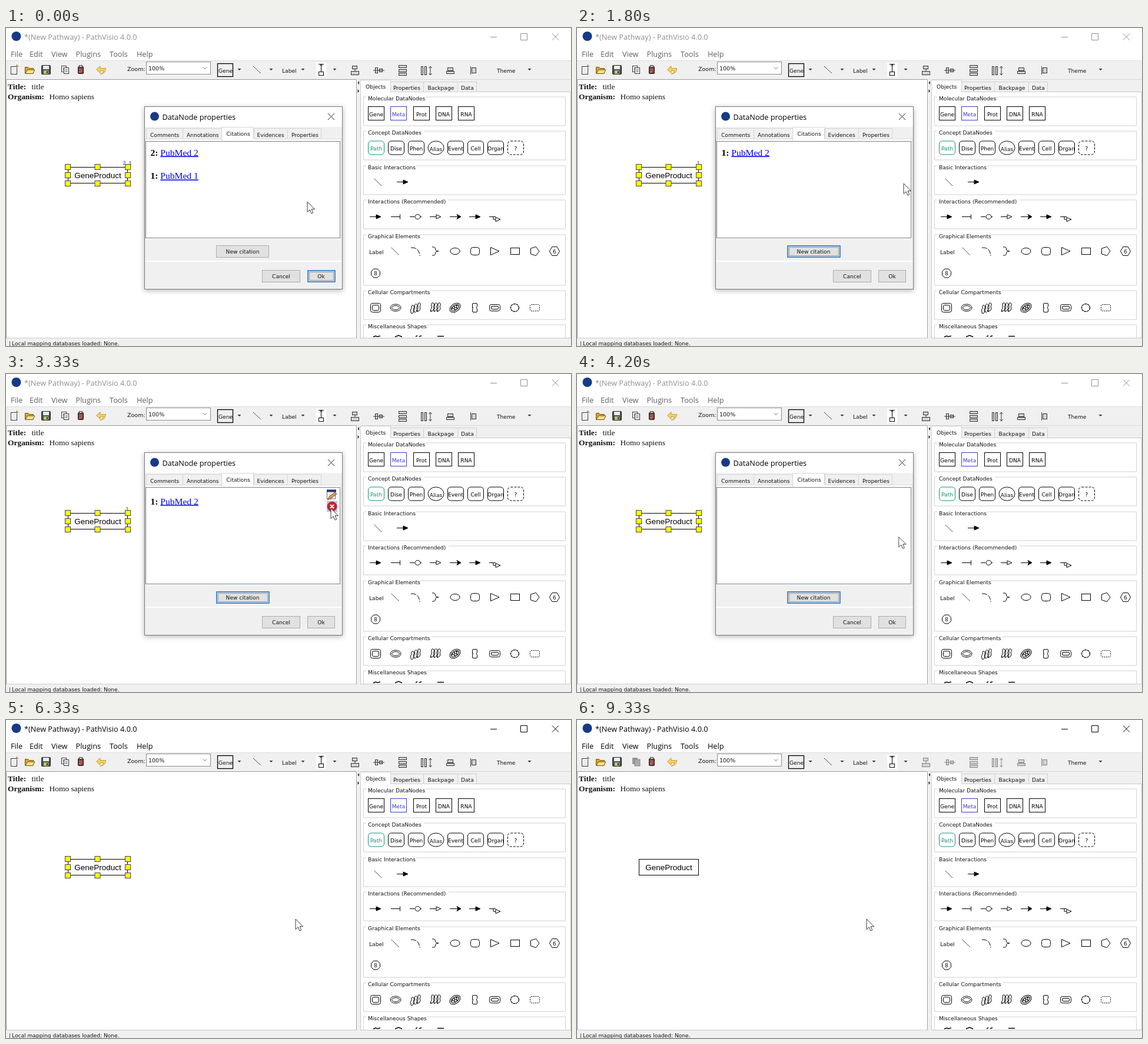
An HTML page for the animation above (9.74 s loop, 960 by 540 pixels).

```html
<!DOCTYPE html>
<html lang="en">
<head>
<meta charset="utf-8">
<title>Citations dialog</title>
<style>
html, body { margin: 0; width: 100%; height: 100%; overflow: hidden; background: #fff; }
svg { display: block; width: 960px; height: 540px; }
text { white-space: pre; }
.ui { font: 9.1px "DejaVu Sans", sans-serif; }
.zoom { font: 9.5px "DejaVu Sans", sans-serif; }
.win { font: 12.7px "Open Sans", sans-serif; }
.serif { font: 13.45px "Liberation Serif", serif; }
.cite { font: 15.6px "Liberation Serif", serif; }
.arial { font: 13.5px "Liberation Sans", sans-serif; }
.tag { font: 9px "Liberation Sans", sans-serif; }
.mid { text-anchor: middle; }
.b { font-weight: bold; }
.link { fill: #00e; text-decoration: underline 1px; }
.line { fill: none; stroke: #000; }

/* Every track shares one 9.74 s clock. */
.t { animation: 9740ms step-end infinite; }
.title { animation-name: title; }
.menu { animation-name: menu; }
.tool { animation-name: tool; }
.late { animation-name: late; }
.picked { animation-name: picked; }
.dialog { animation-name: dialog; }
.pair { animation-name: pair; }
.single { animation-name: single; }
.drop1 { animation-name: drop1; }
.drop2 { animation-name: drop2; }
.icons1 { animation-name: icons1; }
.icons2 { animation-name: icons2; }
.hot1 { animation-name: hot1; }
.hot2 { animation-name: hot2; }
.newring { animation-name: newring; }
.newdots { animation-name: newdots; }
.pressed { animation-name: pressed; }
.cursor { animation: cursor 9740ms ease-in-out infinite; }

@keyframes title { 0% { color: #8f8f8f } 54.1%, 100% { color: #000 } }
@keyframes menu { 0% { color: #5f5f5f } 54.1%, 100% { color: #000 } }
@keyframes tool { 0% { color: #333 } 91.68%, 100% { color: #858585 } }
@keyframes late { 0% { opacity: 0 } 91.68%, 100% { opacity: 1 } }
@keyframes picked { 0% { opacity: 1 } 91.68%, 100% { opacity: 0 } }
@keyframes dialog { 0% { opacity: 1 } 54.1%, 100% { opacity: 0 } }
@keyframes pair { 0% { opacity: 1 } 14.4%, 100% { opacity: 0 } }
@keyframes single { 0% { opacity: 0 } 14.4% { opacity: 1 } 35.9%, 100% { opacity: 0 } }
@keyframes drop1 { 0% { transform: none } 6.5%, 100% { transform: translateY(4.7px) } }
@keyframes drop2 { 0% { transform: none } 23.9%, 100% { transform: translateY(4.7px) } }
@keyframes icons1 { 0% { opacity: 0 } 6.5% { opacity: 1 } 14.4%, 100% { opacity: 0 } }
@keyframes icons2 { 0% { opacity: 0 } 23.9% { opacity: 1 } 35.9%, 100% { opacity: 0 } }
@keyframes hot1 { 0% { opacity: 0 } 8.4% { opacity: 1 } 14.4%, 100% { opacity: 0 } }
@keyframes hot2 { 0% { opacity: 0 } 28.7% { opacity: 1 } 35.9%, 100% { opacity: 0 } }
@keyframes newring { 0% { opacity: 0 } 14.4%, 100% { opacity: 1 } }
@keyframes newdots { 0% { opacity: 0 } 14.4% { opacity: 1 } 50.3%, 100% { opacity: 0 } }
@keyframes pressed { 0% { opacity: 0 } 50.3%, 100% { opacity: 1 } }
@keyframes cursor {
  0%, .7% { transform: translate(512px, 295px) }
  9.75%, 20.5% { transform: translate(555px, 264px) }
  26.7% { transform: translate(544px, 216px) }
  30.8%, 36.4% { transform: translate(552px, 228px) }
  41.6% { transform: translate(547px, 268px) }
  50.8%, 54.9% { transform: translate(540px, 419px) }
  61.6%, 100% { transform: translate(492px, 338px) }
}
</style>
</head>
<body>
<svg id="stage" viewBox="0 0 960 540" xmlns="http://www.w3.org/2000/svg"></svg>
<script>
const text = (x, y, s, cls = "ui", fill = "#111") =>
  `<text x="${x}" y="${y}" class="${cls}" fill="${fill}">${s}</text>`;
const rect = (x, y, w, h, fill = "none", stroke = "none", more = "") =>
  `<rect x="${x}" y="${y}" width="${w}" height="${h}" fill="${fill}" stroke="${stroke}" ${more}/>`;
const path = (d, more = 'class="line"') => `<path d="${d}" ${more}/>`;
const oval = (x, y, rx, ry, more = 'class="line"') =>
  `<ellipse cx="${x}" cy="${y}" rx="${rx}" ry="${ry}" ${more}/>`;
const group = (cls, ...parts) => `<g class="${cls}">${parts.join("")}</g>`;
const solid = c => `fill="${c}"`;
const dash = 'class="line" stroke-dasharray="2 1"';
const cur = "currentColor";

const polygon = (x, y, r, n, turn = 0) => path("M" + Array.from({ length: n }, (_, i) => {
  const a = turn + i * 2 * Math.PI / n;
  return (x + r * Math.cos(a)).toFixed(1) + " " + (y + r * Math.sin(a)).toFixed(1);
}).join("L") + "Z");

function titleBar() {
  return rect(0, 0, 960, 55, "#fff") + oval(17.5, 14, 8, 8, solid("#173a86")) +
    group("t title",
      text(31, 20, "*(New Pathway) - PathVisio 4.0.0", "win", cur),
      path("M823 15.5H834M874.5 9.5H885.5V20.5H874.5ZM928 9.5L939 20.5M939 9.5L928 20.5",
        `fill="none" stroke="${cur}"`)) +
    group("t menu", ...[[8, "File"], [40, "Edit"], [77, "View"], [118.5, "Plugins"], [176, "Tools"], [222, "Help"]]
      .map(([x, s]) => text(x, 49, s, "win", cur)));
}

function toolBar() {
  const arrow = x => path(`M${x - 3} 69H${x + 3}L${x} 72Z`, solid("#333"));
  const page = (x, y) => rect(x, y, 8, 10, "#fff", cur) +
    path(`M${x + 2} ${y + 3}h4m-4 2h4m-4 2h4`, `stroke="${cur}" stroke-width=".7"`);
  const box = (x, y, w, h) => rect(x, y, w, h, "#d2d2d2", cur);
  const bars = d => path(d, `fill="none" stroke="${cur}"`);
  return rect(0, 55, 960, 32, "#f0f0f0") + path("M0 55.5H960", 'stroke="#dcdcdc"') +
    rect(8.5, 65.5, 10, 13, "#fff", "#333") + path("M18.5 62v6m-3-3h6", 'stroke="#8a7440" stroke-width="1.2"') +
    path("M11 69h5m-5 3h5m-5 3h5", 'stroke="#ccc"') +
    path("M32.5 77V66.5h5l2 2h7V77Z", 'fill="#d9a528" stroke="#6e5212"') +
    path("M33 77.5L36.5 71H49L45.5 77.5Z", 'fill="#ffe08a" stroke="#6e5212"') +
    rect(60.5, 63.5, 15, 15, "#4a4f57", "#222", 'rx="1"') + rect(63, 64, 10, 6, "#e9eff4") +
    rect(64, 72, 8, 6, "#b6c56e") + rect(69, 73, 2, 4, "#333") +
    group("t tool", page(94.5, 64.5), page(98.5, 67.5)) +
    group("t late", rect(94, 64, 9, 11, "#999"), rect(98, 67, 9, 11, "#aaa", "#888")) +
    rect(122.5, 65.5, 9, 12, "#7a3a32", "#2a1614", 'rx="1"') + rect(124.5, 63.5, 5, 3, "#ccc", "#444") +
    path("M124 70h6m-6 3h6m-6 2h4", 'stroke="#c99"') +
    path("M153.5 70.5L160 64.5V68.5H169.5Q169.5 77 160 78.5Q166 75 165.5 72.5H160V76.5Z",
      'fill="#f8d25c" stroke="#b58a28" stroke-width=".8"') +
    text(206, 73, "Zoom:", "zoom") + rect(238.5, 57.5, 109, 21, "#fff", "#8a8a8a") + text(242, 72, "100%", "zoom") +
    path("M335 66.5L338 69.5L341 66.5", 'fill="none" stroke="#666"') +
    rect(359.5, 60.5, 26, 22, "#f0f0f0", "#000", 'stroke-width="1.3"') + text(373, 76, "Gene", "ui mid") +
    [396.5, 450.5, 504.5, 558.5, 889.5].map(arrow).join("") +
    path("M420 65L433 77", dash) + text(469, 76, "Label") +
    rect(527, 59, 17, 24, "#fff") + path("M531 61.5H540M535.5 62V74M533 64.5L535.5 62L538 64.5") +
    rect(531.5, 74.5, 8, 6, "#fff", "#000") +
    group("t tool",
      box(588.5, 64.5, 8, 5), box(586.5, 73.5, 13, 6), bars("M593 70V73"),
      box(627.5, 67.5, 4, 9), box(634.5, 69.5, 5, 5), bars("M624 72H643"),
      box(667.5, 63.5, 13, 4), box(667.5, 70.5, 13, 4), box(667.5, 76.5, 13, 4),
      box(705.5, 65.5, 3, 14), box(711.5, 65.5, 3, 14), bars("M721 65V80M718.5 68L721 65L723.5 68M718.5 77L721 80L723.5 77"),
      box(750.5, 67.5, 9, 5), box(748.5, 73.5, 13, 4),
      bars("M789.5 65V79"), box(791.5, 67.5, 7, 9)) +
    text(834, 76, "Theme");
}

function canvasPane() {
  return rect(0, 87, 597, 440, "#fff") + path("M.5 526V87.5H595.5V526", 'fill="none" stroke="#9a9a9a"') +
    path("M0 526.5H960", 'stroke="#ccc"') +
    text(3, 104, "Title:", "serif b") + text(43.5, 104, "title", "serif") +
    text(3, 121, "Organism:", "serif b") + text(73.5, 121, "Homo sapiens", "serif") +
    rect(105.5, 236.5, 101, 27, "#fff", "#000") +
    text(156, 254.5, "GeneProduct", "arial mid", "#000") +
    group("t pair", text(198.5, 232, "2, 1", "tag", "#1c2f9c")) +
    group("t single", text(203.5, 232, "1", "tag", "#222a55")) +
    group("t picked", ...[236, 250, 264].flatMap(y => [105, 155.5, 207]
      .filter(x => x !== 155.5 || y !== 250)
      .map(x => rect(x - 4.5, y - 4.5, 9, 9, "#ffff00", "#444"))));
}

function sidePanel() {
  const frames = [["Molecular DataNodes", 117, 166, 99], ["Concept DataNodes", 175, 224, 96],
    ["Basic Interactions", 234, 283, 83], ["Interactions (Recommended)", 292, 341, 138],
    ["Graphical Elements", 351, 437, 90], ["Cellular Compartments", 446, 495, 108],
    ["Miscellaneous Shapes", 504, 560, 101]];
  const tabs = [[653, 56, 658, "Properties"], [709, 58, 716.5, "Backpage"], [767, 32, 773, "Data"]];
  const frame = ([name, top, end, w]) =>
    path(`M612 ${top}H607.5V${end}H950.5V${top}H${614 + w}`, 'fill="none" stroke="#d0d0d0"') +
    text(615, top + 6, name);
  const node = (x, y, s, c, r) =>
    rect(x + .5, y + .5, 27, 23, "#fff", c, `rx="${r}" ${s === "?" ? 'stroke-dasharray="4 2"' : ""}`) +
    text(x + 14, y + 16.5, s, "ui mid", c);
  const head = (x, y, fill) => path(`M${x} ${y - 3.5}L${x + 8} ${y}L${x} ${y + 3.5}Z`, `fill="${fill}" stroke="#000"`);
  const stem = (x, y, w) => path(`M${x} ${y}H${x + w}`);
  const y = 320.5, g = 379, c = 475;

  const basics = path("M626 256L638 268", dash) + stem(664, 261.5, 12) + head(675, 261.5, "#000");
  const links = stem(618, y, 12) + head(629, y, "#000") +
    stem(654, y, 15) + path(`M669.5 ${y - 4}v8`) +
    stem(686, y, 8) + oval(699.5, y, 4.5, 4) + stem(704, y, 2) +
    stem(720, y, 11) + head(731, y, "#fff") +
    stem(754, y, 18) + path(`M766 ${y - 4}L773 ${y}L766 ${y + 4}L768 ${y}Z`, 'stroke="#000"') +
    stem(787, y, 12) + head(798, y, "#000") +
    path(`M821 ${y}H832M828 ${y}V325H832`) + head(832, 325, "#fff");
  const shapes = text(617, 383.5, "Label") + path("M655 373L668 386", dash) +
    path("M688 373Q702 372 703 387", 'class="line" stroke-dasharray="9 2"') +
    path("M724 372Q730 371 729.5 376Q730 379 735 379Q730 379 729.5 382Q730 387 724 386") +
    oval(763, g, 8, 5.5) + rect(789.5, 372.5, 15, 13, "none", "#000", 'rx="4"') +
    path("M823.5 372.5L838 379L823.5 385.5Z") + rect(857.5, 373.5, 15, 11, "none", "#000") +
    polygon(898, g, 8, 5) + polygon(932, g, 8.5, 6) + text(932, 382.5, "6", "ui mid") +
    polygon(628, 416.5, 8, 8, Math.PI / 8) + text(628, 420, "8", "ui mid");

  // Stacked lobes, growing taller to one side.
  const golgi = (x, grow) => [0, 1, 2].map(k => {
    const left = x - 8 + k * 5.5, top = c - 3 - (grow ? k * 2 : 4);
    return path(`M${left} ${c + 7}q-2 -3 1 -6V${top}q2 -3 4 0q1 3 -1 5q2 3 0 6q-2 3 -4 1Z`);
  }).join("");
  const cells = rect(619.5, 467.5, 17, 15, "none", "#000", 'rx="3"') + rect(622.5, 470.5, 11, 9, "none", "#000", 'rx="2"') +
    oval(662, c, 9, 6) + oval(662, c, 6.5, 3.5) + golgi(696, true) + golgi(730, false) +
    `<g transform="rotate(-35 763 ${c})">${oval(763, c, 10, 6.5)}${oval(763, c, 7.5, 4)}` +
    path(`M757 ${c}l2 -3l2 6l2 -6l2 6l2 -6l2 4`) + "</g>" +
    path(`M792.5 ${c}V469Q792.5 467.5 794 467.5H799Q800.5 467.5 800.5 469V${c - 2}L799 ${c}L800.5 ${c + 2}V481Q800.5 482.5 799 482.5H794Q792.5 482.5 792.5 481V${c + 2}L794 ${c}Z`) +
    rect(821.5, 469.5, 18, 11, "none", "#000", 'rx="3"') + rect(824.5, 472.5, 12, 5, "none", "#000", 'rx="1.5"') +
    oval(864.5, c, 7, 6.5, 'class="line" stroke-width="1.3" stroke-dasharray="4 .8"') +
    rect(890.5, 469.5, 16, 11, "none", "#000", 'rx="2" stroke-dasharray="2 1.5"');
  const misc = path("M624 524.5L628 523L631 524L636 523M661 524.5L667 522L673 524.5M696 524L699 522.5M702 524L706 522.5M733 523.5H744",
    'class="line" stroke-width="1.4"');

  return rect(597, 87, 363, 440, "#f0f0f0") + path("M597 87.5H960", 'stroke="#d8d8d8"') +
    path("M600 90V96L597.5 93ZM597.5 104V110L600 107Z", solid("#222")) +
    rect(602.5, 108.5, 357, 418, "#fff", "#c8c8c8") +
    tabs.map(([x, w, tx, s]) => rect(x + .5, 91.5, w, 17, "#f0f0f0", "#d0d0d0") + text(tx, 105, s)).join("") +
    rect(603, 89, 50, 21, "#fff") + path("M602.5 109V88.5H653.5V109", 'fill="none" stroke="#d0d0d0"') +
    text(611, 103, "Objects") + frames.map(frame).join("") +
    ["Gene", "Meta", "Prot", "DNA", "RNA"].map((s, i) => node(615 + Math.round(i * 38.3), 133, s, i === 1 ? "#3a3ad0" : "#000", 0)).join("") +
    ["Path", "Dise", "Phen", "", "Event", "Cell", "Organ", "?"].map((s, i) => s &&
      node(615 + Math.round(i * 33.85), 191.5, s, i ? "#000" : "#148f77", 5)).join("") +
    oval(730.5, 203.5, 13.5, 11.5) + text(730.5, 208.5, "Alias", "ui mid") +
    basics + links + shapes + cells + misc;
}

function statusBar() {
  return rect(0, 527, 960, 13, "#f0f0f0") + path("M6.5 532V540", 'stroke="#555"') +
    text(10, 539, "Local mapping databases loaded: None.");
}

function editIcons(y, hot) {
  return rect(545.5, y - 8.5, 14, 15, "#fff", "#667") + rect(545, y - 9, 16, 4, "#27366e") +
    path(`M548 ${y}h8m-8 3h6`, 'stroke="#bbb"') +
    path(`M546.5 ${y + 8}L549 ${y + 3}L559 ${y - 5}L562 ${y - 2}L552 ${y + 6}Z`, 'fill="#d99a4e" stroke="#553311" stroke-width=".8"') +
    group("t " + hot, rect(545, y + 10, 18, 19, "#b9c6ee")) +
    oval(554, y + 19.5, 8, 8, 'fill="#d0202c" stroke="#9a1720" stroke-width=".7"') +
    path(`M551 ${y + 16.5}l6 6m0 -6l-6 6`, 'stroke="#fff" stroke-width="2.2"');
}

function dialogBox() {
  const tabs = [[238, 62, 245, "Comments"], [300, 67, 307, "Annotations"], [421, 57, 426.5, "Evidences"], [478, 57, 485, "Properties"]];
  const button = (x, y, w, s) => rect(x + .5, y + .5, w, 20, "#e1e1e1", "#adadad") + text(x + w / 2 + .5, y + 14, s, "ui mid");
  const ring = (x, y, w) => rect(x + 1, y + 1, w - 1, 19, "none", "#2f7fcb", 'stroke-width="1.6"');
  const dots = (x, y, w) => rect(x + 3.5, y + 3.5, w - 6, 14, "none", "#555", 'stroke-dasharray="1 1"');
  const cite = (y, n, id) => text(245.5, y, n + ":", "cite b", "#000") + text(262.3, y, "PubMed " + id, "cite link");
  return rect(235.5, 133.5, 336, 310, "#f0f0f0", "#7a7a7a", 'filter="url(#shade)"') +
    rect(236, 134, 335, 34, "#fff") + oval(252.5, 150, 7.5, 7.5, solid("#173a86")) +
    text(265.5, 156, "DataNode properties", "win", "#000") + path("M547 145L558 156M558 145L547 156", 'stroke="#222"') +
    rect(236.5, 188.5, 333, 170, "#fff", "#d9d9d9") + rect(236, 358, 335, 38, "#f0f0f0") +
    tabs.map(([x, w, tx, s]) => rect(x + .5, 170.5, w, 18, "#f0f0f0", "#d5d5d5") + text(tx, 184.5, s)).join("") +
    rect(366.5, 168.5, 54, 22, "#fff", "#d5d5d5") + rect(367, 188, 54, 4, "#fff") + text(374.5, 182.5, "Citations") +
    rect(237.5, 192.5, 330, 164, "#fff", "#7b7f86") + path("M236 396H571", 'stroke="#fff" stroke-width="2"') +
    button(357, 369, 89, "New citation") + button(435, 411, 64, "Cancel") + button(512, 411, 46, "Ok") +
    group("t pair", ring(512, 411, 47), dots(512, 411, 47)) +
    group("t newring", ring(357, 369, 90)) + group("t newdots", dots(357, 369, 90)) +
    group("t pressed", rect(512.5, 411.5, 46, 20, "#e5f1fb", "#2a80cc"), text(535.5, 425, "Ok", "ui mid"), dots(512, 411, 47)) +
    group("t pair", cite(216.5, 2, 2), group("t drop1", cite(256.3, 1, 1))) +
    group("t single", group("t drop2", cite(216.5, 1, 2))) +
    group("t icons1", editIcons(245, "hot1")) + group("t icons2", editIcons(205.5, "hot2"));
}

document.getElementById("stage").innerHTML =
  `<defs><filter id="shade" x="-10%" y="-10%" width="120%" height="120%">
    <feDropShadow dx="0" dy="2" stdDeviation="4" flood-color="#000" flood-opacity=".3"/></filter></defs>` +
  titleBar() + toolBar() + canvasPane() + sidePanel() + statusBar() +
  group("t dialog", dialogBox()) +
  group("cursor", path("M0 0V17.5L4.2 13.8L7 20L9.8 18.8L7.1 12.7H12.5Z", 'fill="#fff" stroke="#222" stroke-width=".9" stroke-linejoin="round"'));
</script>
</body>
</html>
```
